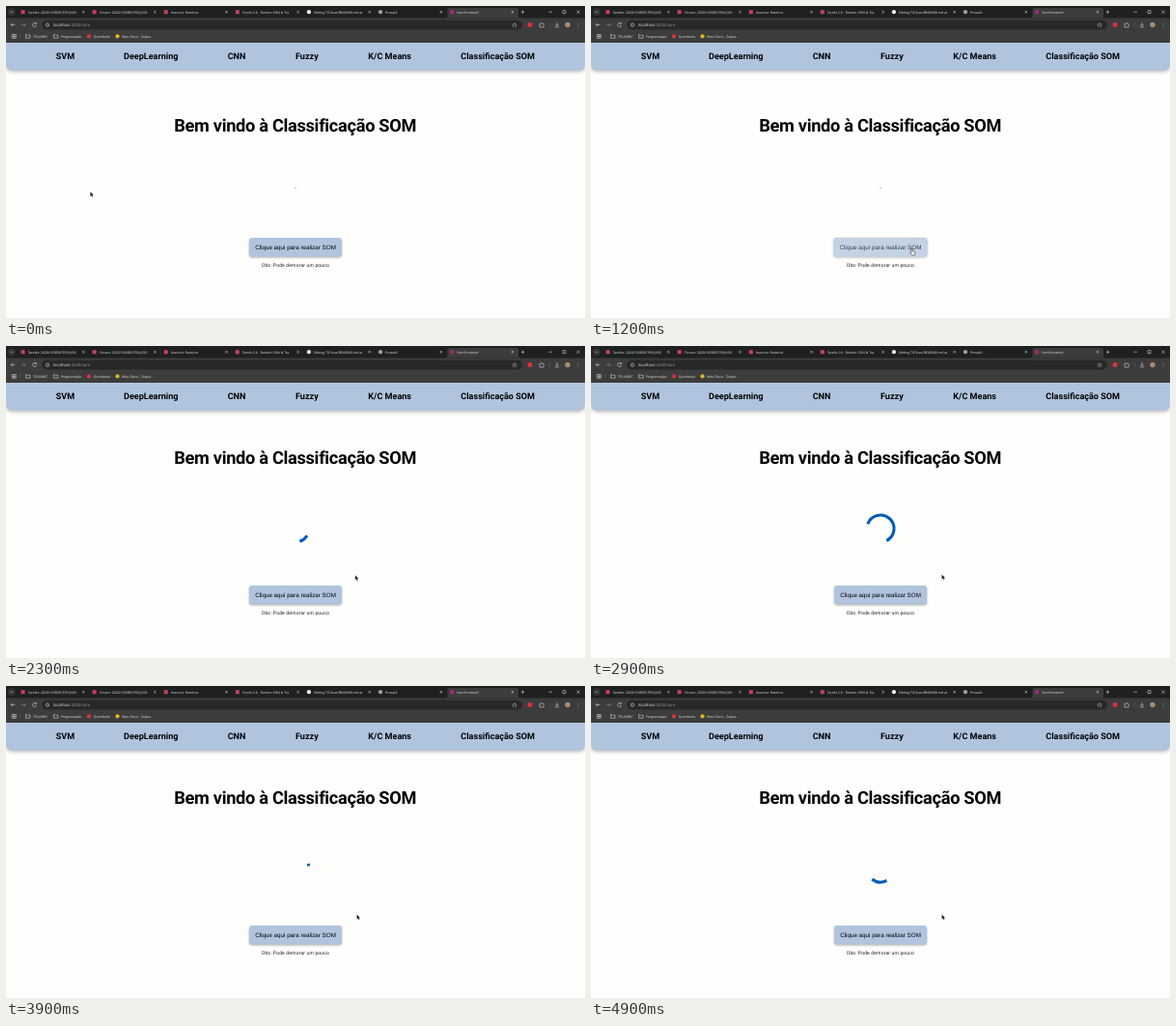
Recreate the animation shown at these times as an HTML page. Size 600 px wide and 323 px high, loop 5 s.

```html
<!DOCTYPE html>
<html lang="pt-BR">
<head>
<meta charset="utf-8">
<title>SomFrontend</title>
<style>
html, body { margin: 0; width: 100%; height: 100%; overflow: hidden; background: #fefefc; }
#stage { display: block; width: 100vw; height: 100vh; }
text { text-rendering: geometricPrecision; white-space: pre; }
.ui { font-family: "Open Sans", "Noto Sans", sans-serif; font-size: 3.5px; fill: #e6e6e6; }
.icon { fill: none; stroke: #d0d0d0; stroke-width: .6; }
.nav { font: 700 9.05px Roboto, sans-serif; }
.bar { fill: #b0c4de; filter: drop-shadow(0 1.5px 2px rgba(0, 0, 0, .35)); }
#title { font: 700 18.2px Roboto, sans-serif; letter-spacing: -.3px; text-anchor: middle; }
#button rect { fill: #b0c4de; filter: drop-shadow(.8px 1px 1px rgba(0, 0, 0, .3)); }
#button text { font: 6.25px "Liberation Sans", Arial, sans-serif; text-anchor: middle; }
#note { font: 5px Roboto, sans-serif; letter-spacing: .156px; fill: #1a1b1f; }
#dash { font: 5px Roboto, sans-serif; text-anchor: middle; }
#spinner { fill: none; stroke: #005cbb; stroke-width: 3.1; }
</style>
</head>
<body>
<svg id="stage" viewBox="0 0 600 323" preserveAspectRatio="none">
  <rect width="600" height="323" fill="#fefefc"/>
  <path class="bar" d="M0 37H600V60Q600 66.500 593 66.500H7Q0 66.500 0 60Z"/>
  <g id="nav"></g>

  <rect width="600" height="14" fill="#1f2020"/>
  <rect y="12.500" width="600" height="25.500" fill="#3c3c3c"/>
  <path d="M455 12.500Q457.500 12.500 457.500 10V4.500Q457.500 2 460 2H528.500Q531 2 531 4.500V10Q531 12.500 533.500 12.500Z" fill="#3c3c3c"/>
  <rect x="37" y="14.700" width="498" height="9.800" rx="4.900" fill="#282828"/>
  <rect x="2" y="2.500" width="7.500" height="7.500" rx="2.500" fill="#333"/>
  <g id="chrome"></g>
  <g class="icon">
    <path d="M4.500 5.700L5.800 7L7.100 5.700M533.700 6.200H537.300M535.500 4.400V8M562.500 6.200H566M577 4.600H580V7.600H577ZM591.400 4.600L594.600 7.800M594.600 4.600L591.400 7.800"/>
    <path d="M9.300 19.500H5.200M7 17.600L5.100 19.500L7 21.400M31.200 18.300A2 2 0 1 0 31.500 20M31.400 17V18.700H29.700"/>
    <path d="M16 19.500H20.100M18.300 17.600L20.200 19.500L18.300 21.400" stroke="#858585"/>
    <circle cx="43" cy="19.600" r="1.700"/>
    <path d="M43 19.400V20.600M43 18.500V18.900" stroke-width=".4"/>
    <path d="M527 17.400L527.700 19H529.300L528 20L528.500 21.600L527 20.700L525.500 21.600L526 20L524.700 19H526.300Z" stroke-width=".4"/>
    <path d="M553 18.300H554.300Q555 16.500 555.700 18.300H557V19.500Q558.500 20.100 557 20.700V22H553Z"/>
    <path d="M571 17V20.300M569.500 19L571 20.500L572.500 19M568.800 21.800H573.200"/>
    <path d="M563.500 17V22M14.500 28.500V34" stroke="#666" stroke-width=".4"/>
    <path d="M593 17.700V18.300M593 19.300V19.900M593 20.900V21.500" stroke-width=".7"/>
    <path d="M6.300 29.500H10.300V33.300H6.300ZM8.300 29.500V33.300M6.300 31.400H10.300"/>
    <path d="M20.500 29.700H22L22.600 30.300H25V33.200H20.500ZM49.500 29.700H51L51.600 30.300H54V33.200H49.500Z"/>
  </g>
  <rect x="540.700" y="17.200" width="4.600" height="4.600" rx=".8" fill="#d8343c"/>
  <circle cx="582" cy="19.500" r="2.700" fill="#a88d70"/>

  <text id="title" x="299.700" y="129.500">Bem vindo à Classificação SOM</text>
  <text id="dash" x="300" y="190">-</text>
  <path id="spinner"/>
  <g id="button">
    <rect x="-48" y="-10" width="96" height="19.500" rx="3"/>
    <text y="2.200">Clique aqui para realizar SOM</text>
  </g>
  <text id="note" x="264.800" y="270.300">Obs: Pode demorar um pouco</text>
  <path id="arrow" d="M0 0V5L1.200 4L2 5.800L2.900 5.400L2.100 3.700H3.600Z" stroke="#fff" stroke-width=".25"/>
  <path id="hand" d="M1 3.200V.8Q1 -.1 1.600 -.1T2.200 .8V2.800L4 3.200Q5 3.400 4.900 4.500L4.400 7H1.700L-.2 4.400Q-.3 3.600 .4 3.800L1 4.400Z" fill="#fff" stroke="#111" stroke-width=".5"/>
</svg>
<script>
const $ = id => document.getElementById(id);
const label = (x, y, s, attrs = 'class="ui"') => `<text x="${x}" y="${y}" ${attrs}>${s}</text>`;
const dot = (x, y, color) => `<circle cx="${x}" cy="${y}" r="2.100" fill="${color}"/>`;
const square = (x, y, color) => `<rect x="${x - 2}" y="${y - 2}" width="4" height="4" fill="${color}"/>`;

$('nav').innerHTML = [[51.7, 'SVM'], [122, 'DeepLearning'], [229.7, 'CNN'], [300, 'Fuzzy'],
  [375.3, 'K/C Means'], [471.3, 'Classificação SOM']]
  .map(([x, s]) => label(x, 54.6, s, 'class="nav"')).join('');

const tabs = [
  ['Tarefas: 2020/1GRDECPDI/J/GR', square, '#c9405a'],
  ['Fóruns: 2020/1GRDECPDI/J/GR', square, '#c9405a'],
  ['Assunto: Roteiros', square, '#c9405a'],
  ['Tarefa 2.6 - Roteiro CNN &amp; Tra', square, '#c9405a'],
  ['Editing TIC3sas/README.md at', dot, '#f0f0f0'],
  ['ProsaIA', dot, '#a0a0a0'],
  ['SomFrontend', square, '#a02a78']
];
$('chrome').innerHTML = tabs.map(([name, mark, color], i) => {
  const x = 17.5 + i * 74.1;
  return mark(x, 6.2, color) +
    `<svg x="${x + 5}" width="54" height="13">${label(0, 7.5, name)}</svg>` +
    `<path class="icon" d="M${x + 61.6} 5l2.400 2.400m0 -2.400l-2.400 2.400"/>`;
}).join('') +
  label(49, 21.1, 'localhost<tspan fill="#9a9a9a">:4200/som</tspan>', 'class="ui" style="font-size:4.2px"') +
  label(28, 32.6, 'TELUMEC') + label(56.7, 32.6, 'Programação') +
  dot(86, 31.3, '#d8343c') + label(90.7, 32.6, 'Quimbrela') +
  dot(115.5, 31.3, '#e0b52c') + label(120, 32.6, 'Meu Disco - Zulpia...');

const clamp = v => Math.min(1, Math.max(0, v));
const ramp = (t, a, b) => clamp((t - a) / (b - a));

// cubic-bezier(.4, 0, .2, 1)
function ease(x) {
  let lo = 0, hi = 1, u = .5;
  for (let i = 0; i < 24; i++) {
    u = (lo + hi) / 2;
    const bx = 1.2 * u * (1 - u) ** 2 + .6 * u * u * (1 - u) + u ** 3;
    if (bx < x) lo = u; else hi = u;
  }
  return u * u * (3 - 2 * u);
}

const SPIN_START = 1225, HALF = 5332 / 8;

function arc(ms) {
  const step = Math.floor(ms / HALF), e = ease(ms / HALF - step);
  const mid = 270 + ms / 1568.2 * 360 + 135 * (step + e);
  const spread = 5 + 135 * (step % 2 ? 1 - e : e);
  const point = deg => {
    const a = deg * Math.PI / 180;
    return `${300 + 14 * Math.cos(a)} ${189 + 14 * Math.sin(a)}`;
  };
  return `M${point(mid - spread)}A14 14 0 ${spread > 90 ? 1 : 0} 1 ${point(mid + spread)}`;
}

// time, x, y of the pointer
const path = [[0, 87.3, 192.2], [600, 437.5, 249.8], [1200, 331, 251], [1300, 331, 251],
  [1800, 341.3, 248.2], [2400, 363.5, 236.5], [5000, 363.5, 236.5]];

function pointer(t) {
  const i = path.findIndex((p, k) => t < path[k + 1][0]);
  const [t0, x0, y0] = path[i], [t1, x1, y1] = path[i + 1];
  const u = ramp(t, t0, t1), s = u * u * (3 - 2 * u);
  return [x0 + (x1 - x0) * s, y0 + (y1 - y0) * s];
}

function draw(t) {
  const busy = t >= 1300, shift = busy ? 8 : 0;
  const [x, y] = pointer(t);
  const over = t >= 1100 && t < 1700;

  $('title').setAttribute('transform', `translate(0 ${-shift})`);
  $('note').setAttribute('transform', `translate(0 ${shift})`);
  $('dash').style.display = busy ? 'none' : '';
  $('spinner').setAttribute('d', busy ? arc(t - SPIN_START) : '');

  const grow = 1 + .015 * (ramp(t, 1000, 1200) - ramp(t, 1700, 1900));
  $('button').setAttribute('transform', `translate(300 ${250 + shift}) scale(${grow})`);
  $('button').style.opacity = 1 - .25 * (ramp(t, 1000, 1200) - ramp(t, 1600, 1800));

  for (const id of ['arrow', 'hand']) {
    $(id).setAttribute('transform', `translate(${x} ${y})`);
    $(id).style.display = (id === 'hand') === over ? '' : 'none';
  }
}

const start = performance.now();
function tick(now) {
  const t = Math.max(0, now - start) % 5000;
  draw(Math.floor(t / 100) * 100);
  requestAnimationFrame(tick);
}
draw(0);
requestAnimationFrame(tick);
</script>
</body>
</html>
```
